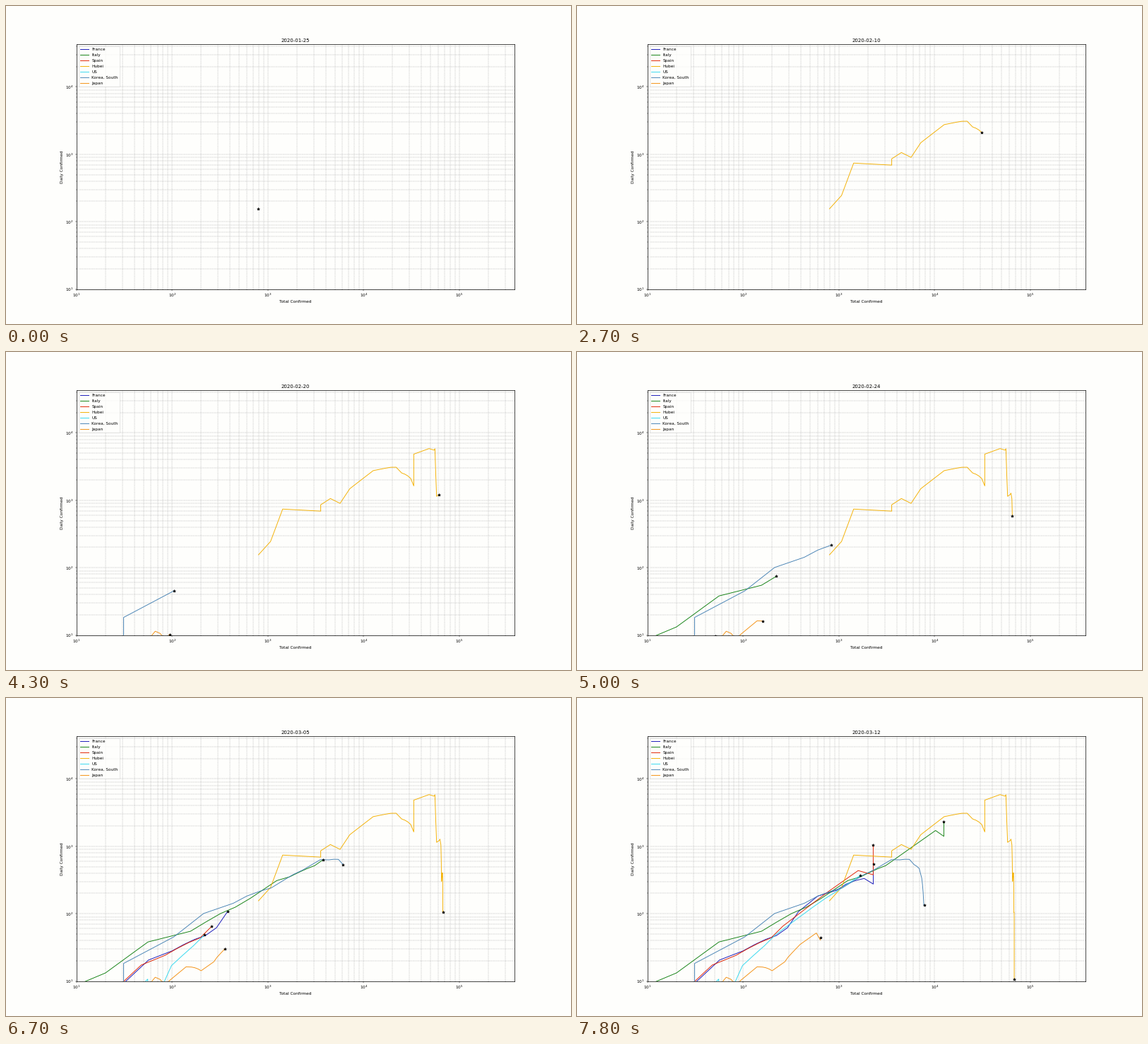
A matplotlib script that plays this animation: 800x450 px, repeating every 8 s.

```python
import numpy as np
import matplotlib.pyplot as plt
from matplotlib.animation import FuncAnimation

K = 800 / 19.2 / 40  # sizes are set for a 19.2 inch wide sheet, drawn at 40 dpi
DAYS = 48
BG = "#fefefc"

plt.rcParams.update({
    "font.family": "DejaVu Sans",
    "font.size": 10 * K,
    "axes.linewidth": 1.2 * K,
    "axes.titlepad": 6 * K,
    "axes.labelpad": 4 * K,
    "lines.linewidth": 1.6 * K,
    "grid.color": "#b0b0b0",
    "grid.linewidth": 0.8 * K,
    "grid.linestyle": "--",
    "legend.edgecolor": "#cccccc",
    "patch.linewidth": 1.0 * K,
})
for axis in ("xtick", "ytick"):
    plt.rcParams.update({
        f"{axis}.major.size": 3.5 * K, f"{axis}.minor.size": 2 * K,
        f"{axis}.major.width": 0.8 * K, f"{axis}.minor.width": 0.6 * K,
        f"{axis}.major.pad": 3.5 * K,
    })

# Turning points of each outbreak as day: total, counted from 22 January.
# Growth between them is exponential.
OUTBREAKS = {
    "France": ("#1414b8", {35: 18, 38: 100, 43: 377, 45: 949, 49: 2281,
                           51: 3661}),
    "Italy": ("#108010", {29: 3, 30: 20, 32: 155, 36: 655, 39: 1694,
                          49: 12462, 51: 17660}),
    "Spain": ("#e02000", {36: 15, 39: 84, 43: 259, 49: 2277, 51: 5232}),
    "Hubei": ("#f4b000", {1: 444, 5: 1423, 6: 3554, 7: 3554, 10: 7153,
                          13: 16678, 16: 24953, 20: 33366, 21: 33366,
                          22: 48206, 23: 54406, 30: 62662, 31: 64084,
                          36: 65596, 39: 66907, 47: 67743, 51: 67786}),
    "US": ("#30d8f0", {32: 15, 33: 51, 37: 60, 40: 98, 43: 217, 48: 959,
                       51: 2179}),
    "Korea, South": ("#4682b4", {28: 31, 29: 104, 31: 433, 33: 833, 37: 2337,
                                 40: 4335, 43: 6088, 46: 7314, 51: 7979}),
    "Japan": ("#f49010", {23: 29, 25: 59, 29: 94, 33: 159, 41: 293, 49: 639,
                          51: 701}),
}
UNREPORTED = 50  # a day on which these countries repeat the previous total
LATE = {"France", "Italy", "Spain", "Japan"}


def curve(name, turns):
    """Totals and their four-day mean growth, one point per day."""
    logs = np.log(list(turns.values()))
    total = np.exp(np.interp(np.arange(DAYS + 4), list(turns), logs))
    if name in LATE:
        total[UNREPORTED] = total[UNREPORTED - 1]
    daily = (total[4:] - total[:-4]) / 4
    return total[3:-1], np.maximum(daily, 0.1)


fig, ax = plt.subplots(figsize=(20, 11.25), dpi=40, facecolor=BG)
fig.subplots_adjust(left=0.125, right=0.9, bottom=0.11, top=0.88)
ax.set_facecolor(BG)
ax.set(xscale="log", yscale="log", xlim=(10, 10**5.576), ylim=(10, 10**4.634),
       xlabel="Total Confirmed", ylabel="Daily Confirmed")
ax.set_axisbelow(True)
ax.grid(True, which="both")
title = ax.set_title("", fontsize=12 * K)

tracks = []
for name, (color, turns) in OUTBREAKS.items():
    line, = ax.plot([], [], color=color, label=name)
    star, = ax.plot([], [], "k*", ms=7 * K, mew=1.0 * K, zorder=4)
    tracks.append((line, star, *curve(name, turns)))
ax.legend(loc="upper left", facecolor=BG)


def draw(tick):
    # three days pass every five ticks, held for 2, 1 and 2 ticks
    day = tick // 5 * 3 + (0, 0, 1, 2, 2)[tick % 5]
    title.set_text(str(np.datetime64("2020-01-25") + day))
    for line, star, x, y in tracks:
        line.set_data(x[:day + 1], y[:day + 1])
        star.set_data(x[day:day + 1], y[day:day + 1])
    return [title]


anim = FuncAnimation(fig, draw, frames=80, interval=100, repeat=True,
                     init_func=lambda: draw(0), blit=False)
plt.show()
```
